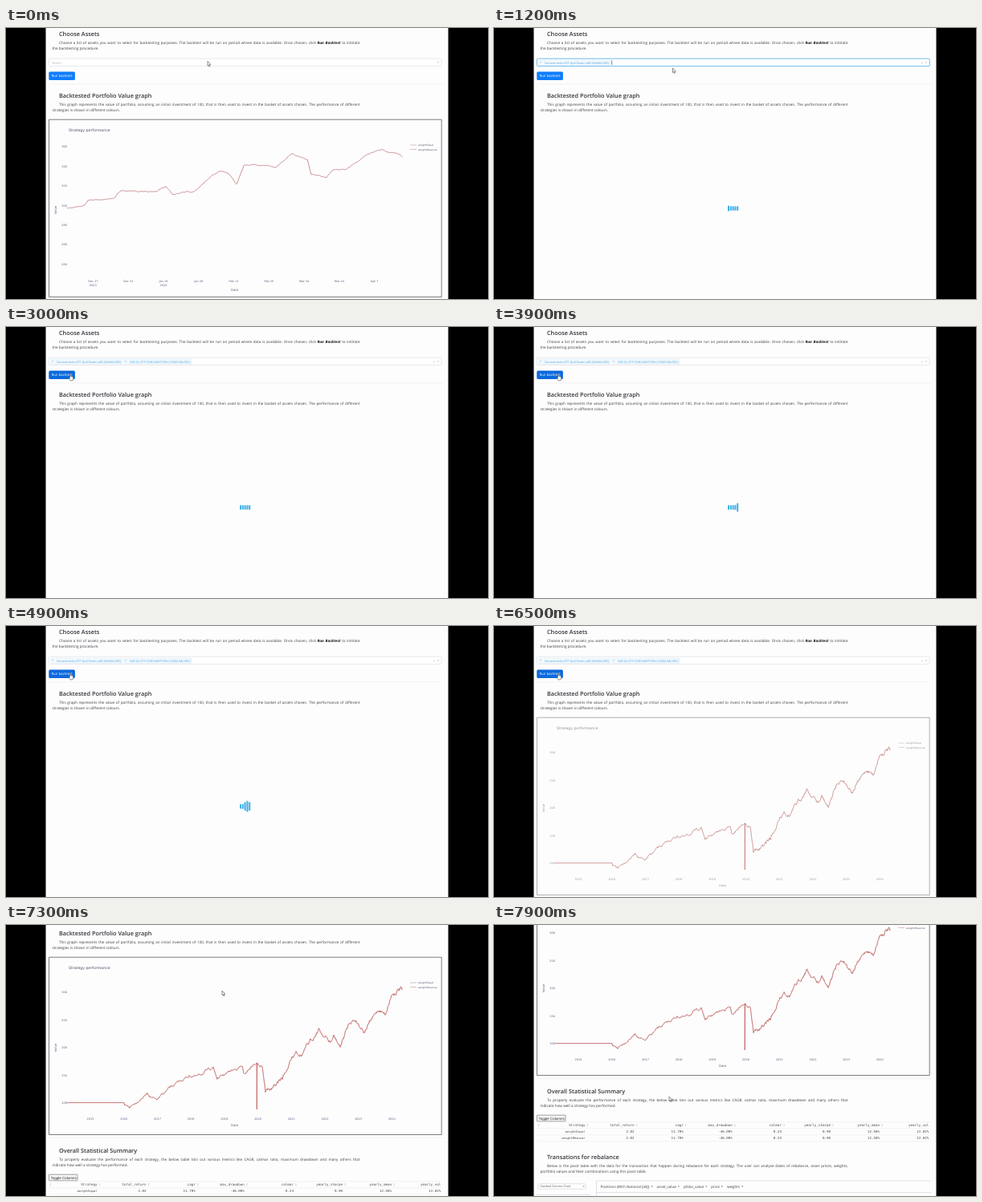
Recreate the animation shown at these times as an HTML page with a canvas. Size 600x338 px, loop 8 s.

```html
<!DOCTYPE html>
<html lang="en">
<head>
<meta charset="utf-8">
<title>Backtest dashboard</title>
<style>
html, body { margin: 0; width: 100%; height: 100%; overflow: hidden; background: #000; }
canvas { display: block; width: 600px; height: 338px; }
</style>
</head>
<body>
<canvas id="stage"></canvas>
<script>
const W = 600, H = 338, LOOP = 8000;
const canvas = document.getElementById('stage');
const ctx = canvas.getContext('2d');
const dpr = window.devicePixelRatio || 1;
canvas.width = W * dpr;
canvas.height = H * dpr;

const UI = '"Open Sans", "Noto Sans", sans-serif';
const PLOT = '"DejaVu Sans", sans-serif';
const MONO = '"DejaVu Sans Mono", monospace';
const INK = '#3a3d42';

// ---- timeline ----
const T = { focus: 400, pick1: 1000, pick2: 2300, hover: 2750, run: 2850, result: 6400, leave: 6750 };
const ease = u => { u = Math.min(1, Math.max(0, u)); return u * u * (3 - 2 * u); };
const step = (t, from, to) => ease((t - from) / (to - from));
const scrollAt = t => 74 * (step(t, 6900, 7250) + step(t, 7450, 7850));

// Each move: start, end, x, y
const MOVES = [
  [300, 900, 222.5, 50], [2350, 2850, 79.5, 58.5], [6700, 7050, 269, 82], [7350, 7750, 218, 214]
];

function pointerAt(t) {
  let x = 251, y = 41.5;
  for (const [from, to, tx, ty] of MOVES) {
    const u = step(t, from, to);
    x += (tx - x) * u;
    y += (ty - y) * u;
  }
  return [x, y];
}

// ---- drawing helpers ----
function text(s, x, y, size, o = {}) {
  ctx.font = `${o.style || ''} ${o.weight || 400} ${size}px ${o.font || UI}`;
  ctx.textAlign = o.align || 'left';
  ctx.fillStyle = o.color || INK;
  ctx.fillText(s, x, y);
  return ctx.measureText(s).width;
}

function box(x, y, w, h, r, fill, stroke, lw = 0.7) {
  ctx.beginPath();
  ctx.roundRect(x, y, w, h, r);
  if (fill) { ctx.fillStyle = fill; ctx.fill(); }
  if (stroke) { ctx.strokeStyle = stroke; ctx.lineWidth = lw; ctx.stroke(); }
}

function path(pts, color, lw) {
  ctx.beginPath();
  for (const [x, y] of pts) ctx.lineTo(x, y);
  ctx.strokeStyle = color;
  ctx.lineWidth = lw;
  ctx.lineJoin = 'round';
  ctx.stroke();
}

const rule = (x1, y1, x2, y2, color, lw = 0.6) => path([[x1, y1], [x2, y2]], color, lw);

function caretDown(x, y, color) {
  ctx.beginPath();
  ctx.moveTo(x - 1.1, y - 0.6);
  ctx.lineTo(x + 1.1, y - 0.6);
  ctx.lineTo(x, y + 0.8);
  ctx.fillStyle = color;
  ctx.fill();
}

// Justified line; words starting with * are bold italic
function justify(line, x, right, y) {
  const words = line.split(' ').map(w => {
    const strong = w[0] === '*';
    const s = strong ? w.slice(1) : w;
    ctx.font = `${strong ? 'italic 700' : '400'} 4.6px ${UI}`;
    return { s, strong, w: ctx.measureText(s).width };
  });
  const gap = (right - x - words.reduce((n, w) => n + w.w, 0)) / (words.length - 1);
  for (const w of words) {
    text(w.s, x, y, 4.6, w.strong ? { style: 'italic', weight: 700, color: '#111' } : {});
    x += w.w + gap;
  }
}

function section(title, y, first, second) {
  text(title, 66, y, 7.3, { weight: 600, color: '#303338' });
  justify(first, 66, 440.5, y + 10);
  text(second, 57.5, y + 17, 4.65);
}

// ---- price curves ----
let seed = 7;
const rand = () => (seed = (seed * 16807) % 2147483647) / 2147483647;

// Joins key points with a mean-reverting random walk on top
function wander(keys, amp) {
  const out = [];
  let drift = 0;
  for (let i = 1; i < keys.length; i++) {
    const [x0, y0] = keys[i - 1], [x1, y1] = keys[i];
    for (let x = x0; x < x1; x += 0.6) {
      out.push([x, y0 + (y1 - y0) * (x - x0) / (x1 - x0) + drift]);
      drift = drift * 0.78 + (rand() - 0.5) * amp;
    }
  }
  return [...out, keys[keys.length - 1]];
}

const RECENT = wander([
  [76, 225], [98, 221], [102, 215], [133, 213], [143, 203], [187, 204], [199, 197], [207, 208],
  [221, 205], [234, 204], [256, 184], [267, 178.5], [277, 181], [287, 195], [296, 171], [318, 171],
  [336, 174], [355, 156.5], [375, 164], [380, 183], [399, 186], [407, 176.5], [424, 176],
  [451, 157], [468, 151], [475, 155], [490, 157], [493, 161]
], 0.8);

const FULL = [
  [76, 295.6], [147, 295.6],
  ...wander([
    [147.6, 299], [153, 302], [176, 284], [187, 293], [204, 277], [228, 262], [238, 263], [258, 251],
    [263, 266], [278, 257], [294, 250], [296, 261], [308, 248], [312.2, 248]
  ], 2.2),
  [312.3, 304], [312.6, 246],
  ...wander([
    [313, 246], [319, 247], [323, 280], [333, 277], [344, 265], [361, 230], [368, 236], [389, 204],
    [404, 221], [408, 213], [416, 226], [428, 194], [435, 192], [446, 206], [464, 179], [472, 185],
    [480, 161], [491, 153], [493, 155]
  ], 4)
];

// ---- page parts ----
function chart(full) {
  const label = (s, x, y, align = 'center', size = 3.5) =>
    text(s, x, y, size, { font: PLOT, color: '#56607a', align });
  box(53.5, 114.2, 488.7, 221.3, 0, '#fefdfe', '#67646b', 0.85);
  text('Strategy performance', 78, 128.5, 4.7, { font: PLOT, color: '#4a5468' });

  if (full) {
    for (let i = 0; i < 5; i++) label(300 - i * 50, 76, 159.3 + i * 34.5, 'right');
    for (let i = 0; i < 10; i++) label(2015 + i, 105 + i * 41.7, 316.5);
    path(FULL, '#b9a3a3', 0.9);
    path(FULL, '#d4625d', 0.6);
  } else {
    for (let i = 0; i < 7; i++) label(360 - i * 20, 76, 149.3 + i * 24.4, 'right');
    for (let i = 0; i < 9; i++) {
      const day = new Date(Date.UTC(2023, 11, 17 + i * 14));
      const s = day.toLocaleDateString('en-US', { month: 'short', day: 'numeric', timeZone: 'UTC' });
      label(s, 108.3 + i * 43.8, 317);
    }
    label('2023', 108.3, 321.5);
    label('2024', 195.9, 321.5);
    path(RECENT, '#bf8084', 0.9);
  }
  label('Date', 284.5, full ? 324.5 : 328.3, 'center', 3.8);
  ctx.save();
  ctx.translate(62.5, 227);
  ctx.rotate(-Math.PI / 2);
  label('Value', 0, 0, 'center', 3.8);
  ctx.restore();

  ['weightEqual', 'weightMeanvar'].forEach((s, i) => {
    const y = 146 + i * 5.4;
    rule(503, y, 511, y, i ? '#d08a86' : '#a39b9d');
    label(s, 513, y + 1.2, 'left', 3.1);
  });
}

// Five bars stretching one after another
function loader(t) {
  const shift = t < T.run ? 1140 : 4360;
  ctx.fillStyle = '#3fb0e6';
  for (let i = 0; i < 5; i++) {
    const p = ((t - shift - i * 100) % 1200 + 1200) % 1200 / 1200;
    const s = p < 0.4 ? 0.4 + 0.3 * (1 - Math.cos(p / 0.2 * Math.PI)) : 0.4;
    const h = 13.5 * s;
    ctx.fillRect(291 + i * 2.8, 225 - h / 2, 2, h);
  }
}

function tag(s, x) {
  ctx.font = `400 3.7px ${UI}`;
  const w = ctx.measureText(s).width;
  box(x, 40, w + 8.5, 6.4, 0.7, '#f3f9fe', '#d6e9f8', 0.5);
  text('×', x + 1.3, 44.4, 3.7, { color: '#4aa3d8' });
  text(s, x + 7, 44.5, 3.7, { color: '#4aa3d8' });
  return x + w + 8.5;
}

function picker(t) {
  const focused = t >= T.focus && t < T.run;
  const count = (t >= T.pick1) + (t >= T.pick2);
  box(53.5, 38.2, 488.7, 9.4, 1.2, '#fff', focused ? '#62b5e8' : '#dcdcdf', focused ? 0.9 : 0.6);
  let end = 56;
  if (count > 0) end = tag('Sorvane India ETF Quill Bank LoRS (BANKLORS)', end);
  if (count > 1) end = tag('SOR QL ETF CONSUMPTION (CONSUMLORS)', end + 2);
  if (!count && !focused) text('Select...', 57, 44.6, 4, { color: '#b4b4b8' });
  if (focused) rule(end + 2, 40.3, end + 2, 46, '#333');
  if (count) text('×', 531.8, 44.5, 4, { color: '#a5a5a8' });
  caretDown(538, 43, '#a5a5a8');
}

const COLS = {
  Strategy: '', total_return: '2.02', cagr: '11.70%', max_drawdown: '-46.00%',
  calmar: '0.24', yearly_sharpe: '0.90', yearly_mean: '12.58%', yearly_vol: '13.82%'
};

function table() {
  const mono = (s, x, y, size = 4.2) => text(s, x, y, size, { font: MONO, align: 'right', color: '#48484c' });
  box(53.5, 385.2, 35.5, 7.6, 0.4, '#f8f8f9', '#77777b');
  text('Toggle Columns', 55.4, 390.6, 4.5, { font: '"Liberation Sans", sans-serif', color: '#222' });
  for (let i = 0; i < 4; i++) rule(53.5, 393.8 + i * 8, 542.5, 393.8 + i * 8, '#e6e6e9', 0.5);
  Object.entries(COLS).forEach(([head, value], i) => {
    const x = 113.5 + i * 61.1;
    rule(x - 58, 396, x - 58, 399.4, '#b8b8bc');
    mono(head, x, 398.8);
    ['weightEqual', 'weightMeanvar'].forEach((name, row) =>
      mono(value || name, x, 406.8 + row * 8, value ? 4.2 : 3.75));
  });
}

function pivot() {
  const line = '#c9cdd6';
  box(55, 470.8, 59, 6.4, 1, '#fff', line, 0.6);
  text('Stacked Column Chart', 57.5, 475.3, 3.7, { color: '#555' });
  caretDown(111.5, 474, '#777');
  rule(127.5, 467, 544, 467, line);
  rule(127.5, 467, 127.5, 500, line);
  rule(127.5, 481.6, 544, 481.6, line);
  box(53.5, 484.5, 66.5, 20, 0.8, '#fff', line, 0.6);
  let x = 132.5;
  for (const s of ['Positions (With Notional [a$])', 'asset_value', 'pfolio_value', 'price', 'weights']) {
    x += text(s, x, 475.7, 4.5);
    caretDown(x + 3.2, 474.2, '#666');
    x += 9.2;
  }
}

function page(t) {
  section('Choose Assets', 9.9,
    'Choose a list of assets you want to select for backtesting purposes. The backtest will be run on period where data is available. Once chosen, click *Run *Backtest to inititate',
    'the backtesting procedure.');
  picker(t);
  const hover = t >= T.hover && t < T.leave;
  box(53.3, 54.6, 32.6, 10.4, 1.5, hover ? '#0b69dc' : '#0f7dfb');
  text('Run backtest', 69.6, 61.4, 4.4, { color: '#fff', align: 'center' });
  rule(53.5, 69.8, 544, 69.8, '#e9e9ec');

  section('Backtested Portfolio Value graph', 86.6,
    'This graph represents the value of portfolio, assuming an initial investment of 100, that is then used to invest in the basket of assets chosen. The performance of different',
    'strategies is shown in different colours.');
  if (t < T.pick1) {
    chart(false);
  } else if (t < T.result) {
    loader(t);
  } else {
    ctx.globalAlpha = Math.min(1, 0.4 + (t - T.result) / 500);
    chart(true);
    ctx.globalAlpha = 1;
  }
  rule(53.5, 339.6, 544, 339.6, '#e9e9ec');

  section('Overall Statistical Summary', 357.8,
    'To properly evaluate the performance of each strategy, the below table lists out various metrics like CAGR, calmar ratio, maximum drawdown and many others that',
    'indicate how well a strategy has performed.');
  table();
  section('Transations for rebalance', 439.6,
    'Below is the pivot table with the data for the transaction that happen during rebalance for each strategy. The user can analyse dates of rebalance, asset prices, weights,',
    'portfolio values and their combinations using this pivot table.');
  pivot();
}

const ARROW = new Path2D('M0 0V5.6L1.2 4.5 2.1 6.6 3 6.2 2.1 4.2 3.8 4.1Z');
const HAND = new Path2D('M0 .5Q.7-.4 1.3 .5V3L4 3.6 4.2 6 3.4 8.4H.6L-1.4 5.4-.8 4.8 0 5.4Z');

function pointer(t) {
  const shape = t >= T.hover && t < T.leave ? HAND : ARROW;
  ctx.save();
  ctx.translate(...pointerAt(t));
  ctx.fillStyle = '#fff';
  ctx.fill(shape);
  ctx.strokeStyle = '#444';
  ctx.lineWidth = 0.6;
  ctx.stroke(shape);
  ctx.restore();
}

function draw(t) {
  ctx.setTransform(dpr, 0, 0, dpr, 0, 0);
  ctx.textRendering = 'geometricPrecision';
  ctx.fillStyle = '#000';
  ctx.fillRect(0, 0, W, H);
  ctx.save();
  ctx.beginPath();
  ctx.rect(49.5, 0, 501, H);
  ctx.clip();
  ctx.fillStyle = '#fefdfe';
  ctx.fillRect(49, 0, 502, H);
  ctx.translate(0, -scrollAt(t));
  page(t);
  ctx.restore();
  pointer(t);
}

const start = performance.now();
function tick() {
  draw((performance.now() - start) % LOOP);
  requestAnimationFrame(tick);
}
tick();
</script>
</body>
</html>
```
